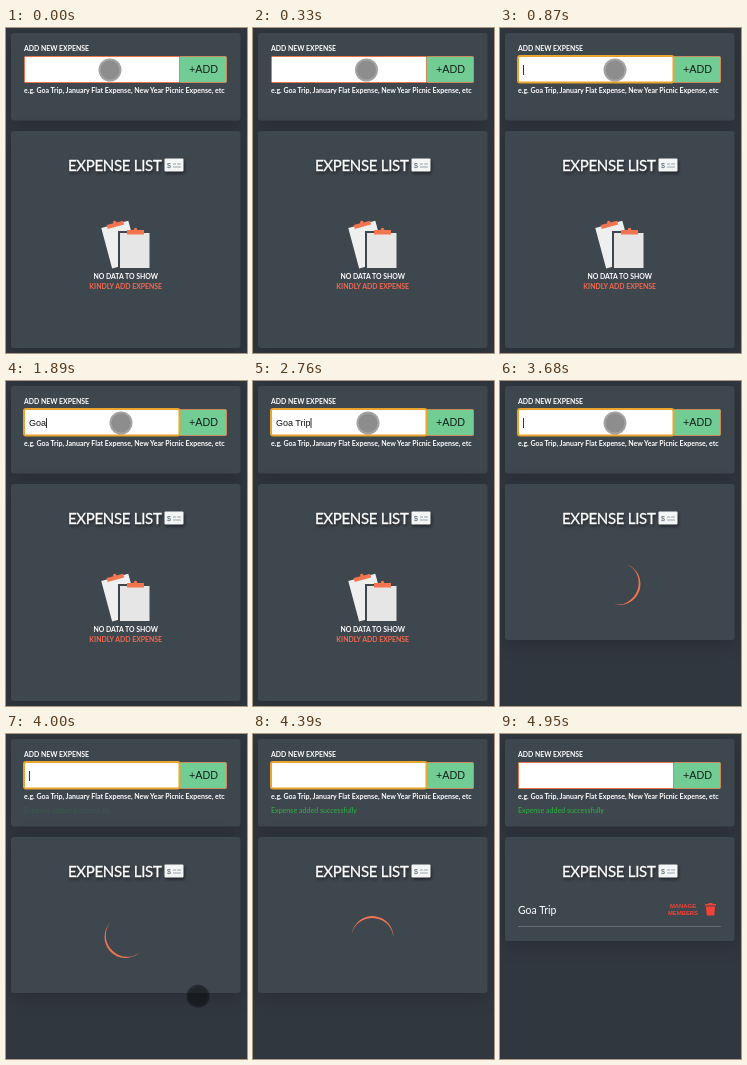
Recreate the animation shown at these times as an HTML page. Size 241 by 325 pixels, loop 5000 ms.

```html
<!DOCTYPE html>
<html lang="en">
<head>
<meta charset="utf-8">
<title>Add expense</title>
<style>
  html, body { margin: 0; width: 100%; height: 100%; overflow: hidden; background: #31373f; }
  svg { display: block; width: 241px; height: 325px; font-family: Lato, sans-serif; fill: #fff; }
  .card { fill: #3e464e; filter: drop-shadow(0 4px 9px rgba(0, 0, 0, .18)); }
  .small { font-size: 6.9px; font-weight: 700; }
  .mid { text-anchor: middle; }
  .ui { font-family: "Liberation Sans", Arial, sans-serif; }
  .shade { filter: drop-shadow(1px 2px 1.5px rgba(0, 0, 0, .5)); }
  .accent { fill: #f3754f; }
  .red { fill: #f44336; }
</style>
</head>
<body>
<svg viewBox="0 0 241 325">
  <rect class="card" x="5" y="5" width="229.5" height="87.5" rx="3"/>
  <rect class="card" id="list" x="5" y="103" width="229.5" height="217" rx="3"/>

  <text class="small" x="18" y="23">ADD NEW EXPENSE</text>
  <rect x="18.5" y="28.5" width="155" height="26" rx="1" stroke="#e9764f"/>
  <rect x="173.5" y="28.5" width="47" height="26" rx="1" fill="#72cd95" stroke="#c98a60"/>
  <text class="ui" x="183" y="45.3" font-size="10.8" fill="#14201a">+ADD</text>
  <rect id="ring" x="18" y="28" width="155.5" height="26.5" rx="2" fill="none" stroke="#eaa52c" stroke-width="2"/>
  <text class="ui" id="typed" x="23" y="45" font-size="9" fill="#111"></text>
  <rect id="caret" y="37" width="1" height="10" fill="#333"/>
  <text class="small" x="18" y="65" style="font-size: 7px">e.g. Goa Trip, January Flat Expense, New Year Picnic Expense, etc</text>
  <text id="message" x="18" y="79" font-size="7.1" fill="#2fb344">Expense added successfully</text>

  <g class="shade">
    <text x="62" y="143" font-size="15" letter-spacing="-.3" stroke="#fff" stroke-width=".3">EXPENSE LIST</text>
    <rect x="158.5" y="130.5" width="19" height="13" rx="1" fill="#f4f6f6"/>
  </g>
  <text class="ui" x="161" y="139.500" font-size="7" fill="#4d5a62">$</text>
  <path d="M167 136h3m1 0h4M167 139h8" stroke="#9aa5aa"/>

  <g id="empty">
    <g transform="rotate(-15 113 216)">
      <rect x="100" y="196" width="28" height="42" fill="#f0eff0"/>
      <rect class="accent" x="106" y="194.500" width="17" height="4"/>
      <circle class="accent" cx="114.5" cy="194" r="1.7"/>
    </g>
    <rect x="113" y="204" width="31.5" height="37" fill="#e6e6e6" stroke="#3e464e" stroke-width="2"/>
    <rect class="accent" x="121" y="202" width="17" height="4.500"/>
    <circle class="accent" cx="129.5" cy="201.500" r="1.7"/>
    <text class="small mid" x="119.7" y="251.300">NO DATA TO SHOW</text>
    <text class="small mid" x="119.7" y="261.300" fill="#f2694f">KINDLY ADD EXPENSE</text>
  </g>

  <!-- crescent: two arcs of slightly different radius -->
  <path id="spinner" class="accent" d="M0-21A21 21 0 0 0 0 21A20 21 0 0 1-19 0A20 21 0 0 1 0-21"/>

  <g id="row">
    <text x="18" y="180" font-size="10.5">Goa Trip</text>
    <g class="ui mid red" font-size="5.9" font-weight="700">
      <text x="183" y="174">MANAGE</text>
      <text x="183" y="181">MEMBERS</text>
    </g>
    <path class="red" d="M205 170h3l1-1h3l1 1h3v1.5h-11zM206 172.5h9l-.6 8q-.1 1-1.1 1h-5.6q-1 0-1.1-1z"/>
    <path d="M18 192.5H221" stroke="#646a71"/>
  </g>

  <g id="pointer">
    <circle r="11.5" fill-opacity=".36" fill="#000"/>
    <circle r="9.5" fill-opacity=".13" fill="#000"/>
  </g>
</svg>
<script>
const LOOP = 5000, LOAD = 2910, DONE = 4430;
// [time, typed length]
const KEYS = [[1020, 1], [1270, 2], [1420, 3], [2120, 4], [2190, 5], [2530, 7], [2760, 8], [LOAD, 0]];
// [time, x, y]
const PATH = [[70, 104, 42], [410, 115, 42], [3780, 115, 42], [3980, 192, 262], [4150, 192, 266]];

const el = id => document.getElementById(id);
const show = (id, alpha) => { el(id).style.opacity = +alpha; };
const ramp = (t, a, b) => Math.min(1, Math.max(0, (t - a) / (b - a)));
const ease = p => p * p * (3 - 2 * p);
const between = (t, a, b) => t >= a && t < b;

function pointerAt(t) {
  let [, x, y] = PATH[0];
  for (let i = 1; i < PATH.length; i++) {
    const [t0, x0, y0] = PATH[i - 1], [t1, x1, y1] = PATH[i];
    const p = ease(ramp(t, t0, t1));
    x += (x1 - x0) * p;
    y += (y1 - y0) * p;
  }
  return [x, y];
}

function caretOn(t) {
  if (t < LOAD) return between(t, 870, 1490) || t >= 1890;
  return between(t, 3600, 4100) || between(t, 4600, 4950);
}

function draw(t) {
  const typed = el("typed");
  const count = KEYS.reduce((n, [at, len]) => t >= at ? len : n, 0);
  typed.textContent = "Goa Trip".slice(0, count);
  el("caret").setAttribute("x", 23 + (count && typed.getComputedTextLength()));
  show("caret", caretOn(t));
  show("ring", between(t, 870, 4950));

  show("empty", t < LOAD);
  show("spinner", between(t, LOAD, DONE));
  show("row", t >= DONE);
  show("message", ramp(t, 3920, 4400));
  el("list").setAttribute("height", t < LOAD ? 217 : t < DONE ? 156 : 104);
  el("spinner").setAttribute("transform", `translate(119.5 203) rotate(${10 + (t - 3150) * 0.36})`);

  el("pointer").setAttribute("transform", `translate(${pointerAt(t)})`);
  show("pointer", 1 - ramp(t, 4200, 4310));
}

const start = performance.now();
function tick() {
  draw((performance.now() - start) % LOOP);
  requestAnimationFrame(tick);
}
tick();
</script>
</body>
</html>
```
